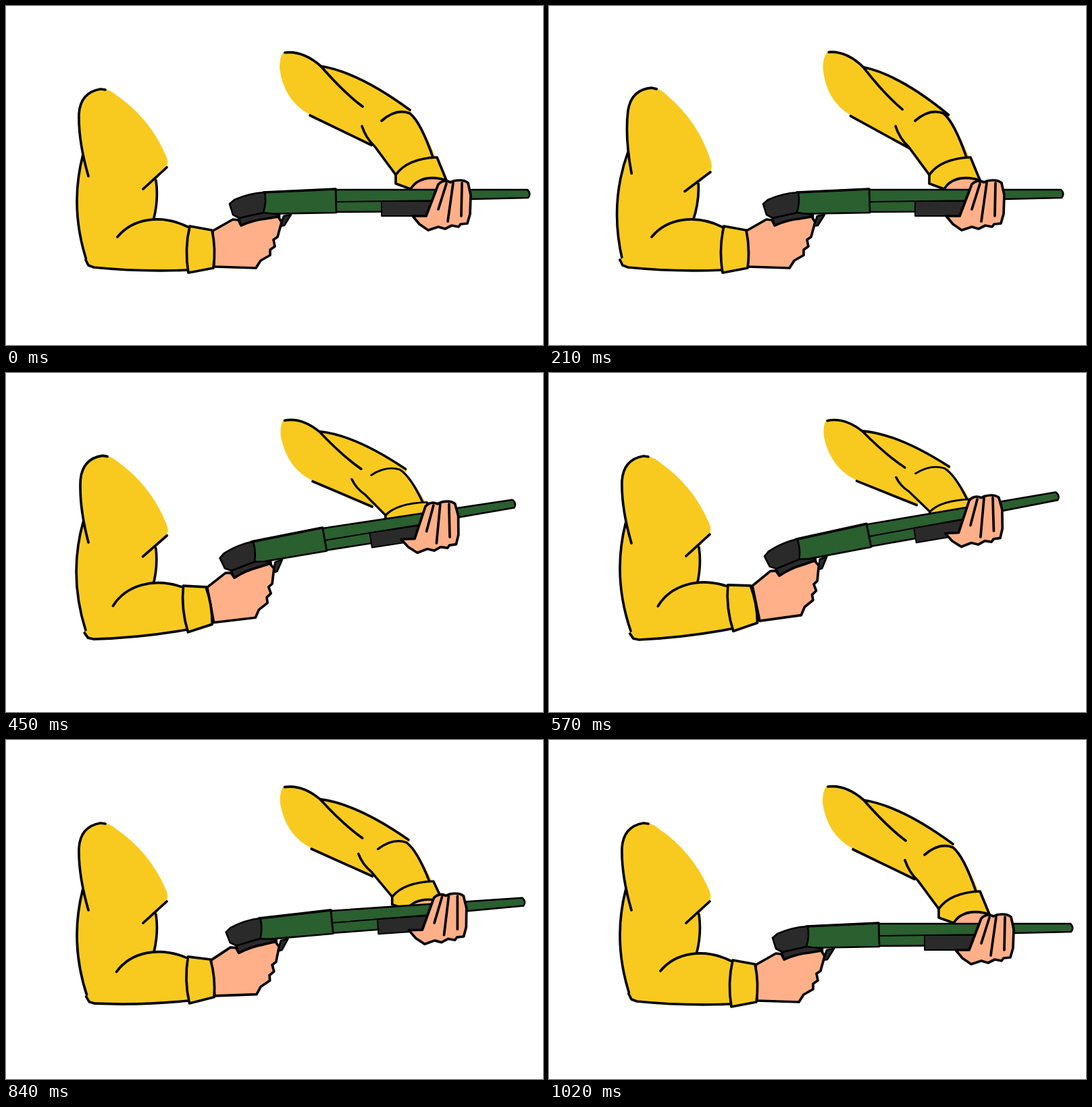
An HTML page for the animation above (1050 ms loop, 795 by 502 pixels).

```html
<!DOCTYPE html>
<html lang="en">
<head>
<meta charset="utf-8">
<title>Recoil</title>
<style>
html, body { margin: 0; width: 100%; height: 100%; overflow: hidden; background: #fff; }
svg { display: block; width: 100vw; height: 100vh; }
path { stroke: #000; stroke-width: 3.7; stroke-linejoin: round; stroke-linecap: round; fill: none; }
.sleeve { fill: #f8ca20; }
.skin { fill: #ffb088; }
.green { fill: #2a5f2f; stroke-width: 2.6; }
.dark { fill: #2a2a2a; stroke-width: 2.6; }
.bare { stroke: none; }
.thin { stroke-width: 2; }
</style>
</head>
<body>
<svg viewBox="0 0 795 502">
  <g id="farUpper">
    <path class="sleeve bare" d="M411 68Q405 75 405 92Q411 140 450 161L541 206L600 156Q522 98 466 89Q440 66 411 68z"/>
    <path d="M413 69Q440 66 466 89Q500 128 528 149M466 89Q522 98 598 154M450 162L541 206"/>
  </g>
  <g id="farFore">
    <path class="sleeve bare" d="M527 178L545 207L577 250Q595 226 636 224Q618 180 600 160Q580 148 556 170z"/>
    <path d="M527 178Q533 196 546 208L577 250M556 170Q578 151 598 159Q614 172 632 224"/>
    <path class="skin" d="M598 271Q606 255 640 253L655 262L640 285L600 285z"/>
    <path class="sleeve" d="M577 250Q594 226 638 224L652 258L644 256Q612 250 599 271L577 263z"/>
  </g>
  <g id="gun">
    <path class="dark" d="M411 311L422 309L412 325L406 326z"/>
    <path class="green" d="M488 272L772 272Q778 278 773 284L688 286L640 304L489 305z"/>
    <path class="thin" d="M489 290L640 288"/>
    <path class="dark thin" d="M556 289L640 289L622 311L556 311z"/>
    <path class="green" d="M381 276L488 271L489 306L381 308z"/>
    <path d="M381 276L488 271"/>
    <path class="dark" d="M345 314L381 306L405 309L405 314L375 320L348 326z"/>
    <path class="dark" d="M331 293L338 287Q360 277 383 276Q386 290 381 306L345 314L336 309z"/>
    <path class="skin" d="M306 333L336 316L344 317L348 325Q366 317 385 315L403 312L408 320L402 342L396 346L398 356L391 361L391 369L377 377L370 388L308 386z"/>
    <g id="farHand">
      <path class="skin" d="M602 311L612 323L625 332L640 327L650 330L660 325L670 327L673 323L683 322L687 308L688 280L684 262Q677 256 663 259L658 261Q648 256 640 264L622 311z"/>
      <path d="M652 263L640 301M662 262L654 319M675 262L674 311"/>
    </g>
  </g>
  <g id="nearUpper">
    <path class="sleeve bare" d="M108 160Q110 128 140 123Q152 122 162 131Q212 165 236 220Q242 232 237 239L222 258Q226 285 219 316L165 345L122 384Q93 300 115 218Q106 190 108 160z"/>
    <path d="M147 124L140 123Q110 128 108 160Q107 200 122 252M114 220Q93 300 121 382M238 239L203 271M222 258Q226 285 219 314"/>
  </g>
  <g id="nearFore">
    <path class="sleeve bare" d="M118 376L122 384L130 387Q200 394 269 391L269 327C230 308 188 314 165 342z"/>
    <path d="M118 376L122 384L130 387Q200 394 269 391M165 342C188 314 230 308 269 327"/>
    <path class="sleeve" d="M272 326L305 332Q311 360 307 388L270 395Q264 360 272 326z"/>
  </g>
</svg>
<script>
const LOOP = 1050, STEP = 30;
// time, gun x, gun y, gun tilt, near upper arm tilt
const poses = [
  [0, 0, 0, 0, 0],
  [240, -16, 0, 0, 6.2],
  [510, -20.4, -54, -11, 0],
  [1020, 0, 0, 0, 0],
  [LOOP, 0, 0, 0, 0]
];

function poseAt(t) {
  const i = poses.findIndex(p => p[0] > t);
  const a = poses[i - 1], b = poses[i];
  const k = (t - a[0]) / (b[0] - a[0]);
  return a.map((v, j) => v + (b[j] - v) * k);
}

function place(id, transform) {
  document.getElementById(id).setAttribute("transform", transform);
}

function draw(t) {
  const [, x, y, tilt, swing] = poseAt(t);
  const reach = 1 + 0.0015 * x + 0.004 * tilt;
  const squash = 1 + 0.03 * tilt;
  place("gun", `translate(${x} ${y}) rotate(${tilt} 488 271)`);
  place("farHand", `rotate(${-0.7 * tilt} 655 295)`);
  place("farUpper", `translate(430 90) rotate(${-0.18 * x + 0.9 * tilt}) scale(${reach} 1) translate(-430 -90)`);
  place("farFore", `translate(${x - 0.5 * tilt} ${170 + 2.2 * tilt}) scale(1 ${squash}) translate(0 -170)`);
  place("nearUpper", `rotate(${swing} 165 252)`);
  place("nearFore", `translate(${-2.4 * swing - 0.3 * tilt} ${-0.95 * tilt}) rotate(${0.87 * tilt} 122 384)`);
}

const start = performance.now();
function tick() {
  const t = (performance.now() - start) % LOOP;
  draw(Math.floor(t / STEP) * STEP);
  requestAnimationFrame(tick);
}
tick();
</script>
</body>
</html>
```
